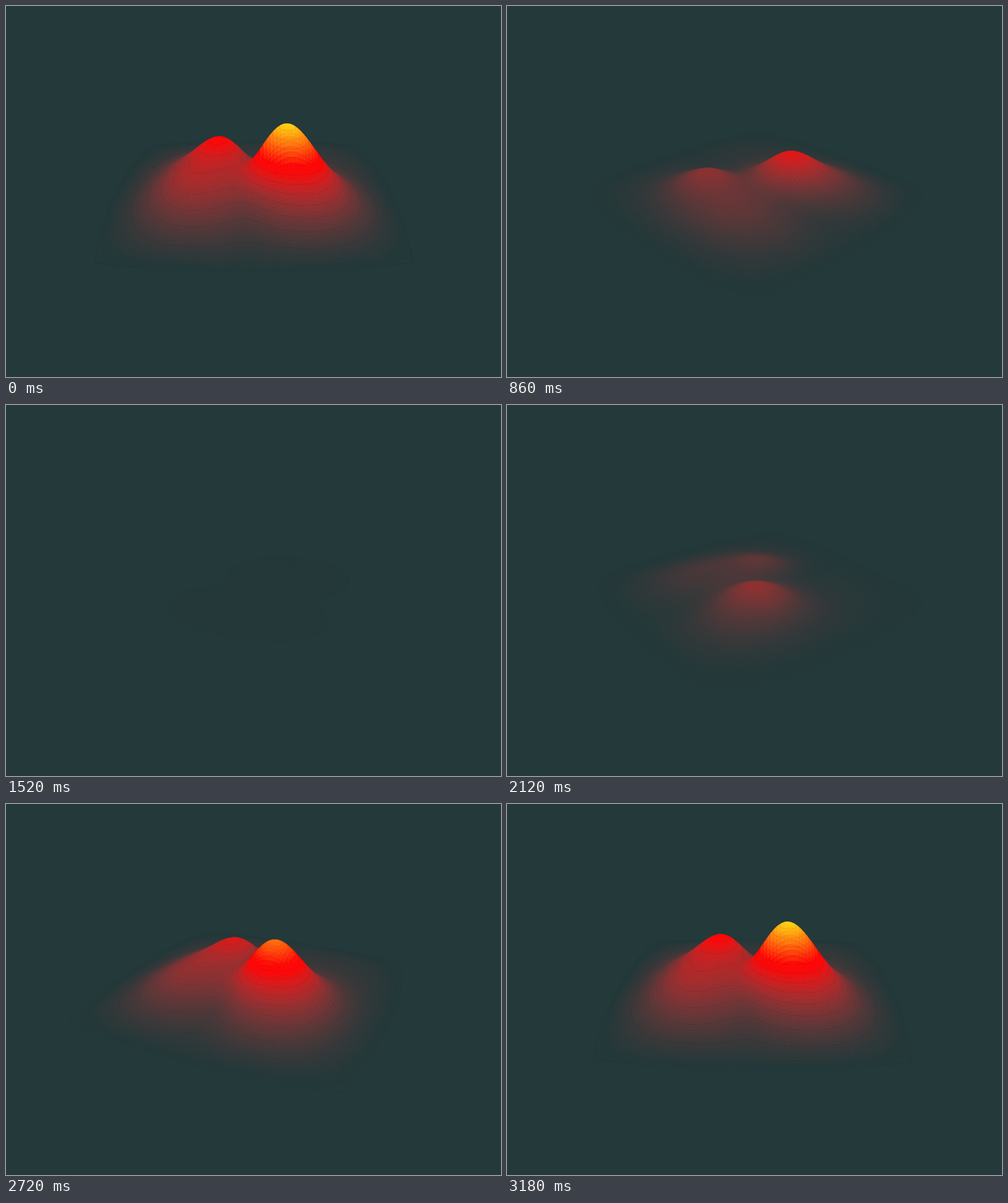
Write an HTML page with a canvas that moves like this. It is 800x600 px and loops after 3.2 s.

```html
<!DOCTYPE html>
<html lang="en">
<head>
<meta charset="utf-8">
<title>Rotating surface</title>
<style>
html, body { margin: 0; width: 100%; height: 100%; overflow: hidden; background: #23393a; }
canvas { display: block; }
</style>
</head>
<body>
<canvas id="stage" width="800" height="600"></canvas>
<script>
const ctx = document.getElementById('stage').getContext('2d');
const LOOP = 3200, N = 90, BACK = '#23393a';
const FOCAL = 848, DIST = 4.2, SIN = 0.449, COS = 0.893;
const LINE_STEP = 0.05, TOP = 0.62, SHADES = 160;

const hill = (dx, dy, sx, sy = sx) => Math.exp(-((dx / sx) ** 2 + (dy / sy) ** 2) / 2);

// Two peaks, each on a long ridge, with a crease between them
function height(x, y) {
  return 0.05
    + 0.39 * hill(x - 0.21, y - 0.15, 0.19)
    + 0.22 * hill(x + 0.25, y + 0.27, 0.18)
    + 0.20 * hill(x + 0.45, y - 0.15, 0.27, 0.42)
    + 0.24 * hill(x - 0.40, y - 0.30, 0.27, 0.35)
    - 0.05 * hill(x + 0.02, y, 0.10, 0.50);
}

// Slate rises to red, then red turns to yellow
function shade(h) {
  const warm = Math.min(1, h / 0.36), hot = Math.max(0, (h - 0.4) / 0.21);
  const r = 35 + 220 * warm ** 1.1;
  const g = 57 - 49 * warm ** 3 + 190 * hot;
  const b = 58 - 50 * warm ** 3 + 12 * hot;
  return `rgb(${[r, g, b].map(Math.round)})`;
}
const palette = Array.from({ length: SHADES + 1 }, (_, i) => shade(i / SHADES * TOP));

// Square sheet whose sides bow outwards and whose rim stays at zero
const grid = [];
for (let j = 0; j <= N; j++) {
  for (let i = 0; i <= N; i++) {
    const u = 2 * i / N - 1, v = 2 * j / N - 1;
    const x = u * (1 + 0.1 * (1 - v * v)), y = v * (1 + 0.1 * (1 - u * u));
    const h = height(x, y) * (1 - u ** 4) * (1 - v ** 4);
    grid.push({ x, y, h, px: 0, py: 0 });
  }
}

function project(angle, amp) {
  const c = Math.cos(angle), s = Math.sin(angle);
  for (const p of grid) {
    const x = p.x * c + p.y * s, y = p.y * c - p.x * s, z = p.h * amp;
    const scale = FOCAL / (DIST - y * COS - z * SIN);
    p.px = 400 + x * scale;
    p.py = 300 + (y * SIN - z * COS) * scale;
  }
}

function trace(points) {
  ctx.beginPath();
  for (const p of points) ctx.lineTo(p.px, p.py);
}

function contour(quad, low, high, ink) {
  ctx.strokeStyle = ink;
  for (let n = Math.ceil(low / LINE_STEP); n <= high / LINE_STEP; n++) {
    const level = n * LINE_STEP, hits = [];
    quad.forEach((a, k) => {
      const b = quad[(k + 1) % 4];
      if ((a.h < level) === (b.h < level)) return;
      const f = (level - a.h) / (b.h - a.h);
      hits.push({ px: a.px + (b.px - a.px) * f, py: a.py + (b.py - a.py) * f });
    });
    trace(hits);
    ctx.stroke();
  }
}

function rim(ink) {
  const side = at => Array.from({ length: N }, (_, k) => grid[at(k)]);
  const row = N + 1, last = row * row - 1;
  trace([
    ...side(k => k),
    ...side(k => N + k * row),
    ...side(k => last - k),
    ...side(k => last - N - k * row)
  ]);
  ctx.closePath();
  ctx.strokeStyle = ink;
  ctx.stroke();
}

function draw(time) {
  let t = time % LOOP;
  if (t > 1520 && t < 1800) t = 1520;
  if (t >= LOOP / 2) t -= LOOP;

  const angle = t * 0.05 * Math.PI / 180;
  const amp = Math.cos(Math.PI * t / LOOP) ** 1.65;
  const ink = `rgba(30,25,45,${0.2 * amp * amp})`;
  project(angle, amp);

  ctx.fillStyle = BACK;
  ctx.fillRect(0, 0, 800, 600);
  ctx.lineWidth = 0.7;
  rim(ink);

  // Far cells first
  for (let j = 0; j < N; j++) {
    for (let k = 0; k < N; k++) {
      const i = angle > 0 ? N - 1 - k : k, o = j * (N + 1) + i;
      const quad = [grid[o], grid[o + 1], grid[o + N + 2], grid[o + N + 1]];
      const hs = quad.map(p => p.h);
      const mean = (hs[0] + hs[1] + hs[2] + hs[3]) / 4 * amp;
      const tone = Math.min(SHADES, Math.round(mean / TOP * SHADES));
      if (!tone) continue;
      ctx.fillStyle = ctx.strokeStyle = palette[tone];
      trace(quad);
      ctx.closePath();
      ctx.fill();
      ctx.stroke();
      if (amp > 0.6) contour(quad, Math.min(...hs), Math.max(...hs), ink);
    }
  }
}

const start = performance.now();
function tick() {
  draw(performance.now() - start);
  requestAnimationFrame(tick);
}
tick();
</script>
</body>
</html>
```
